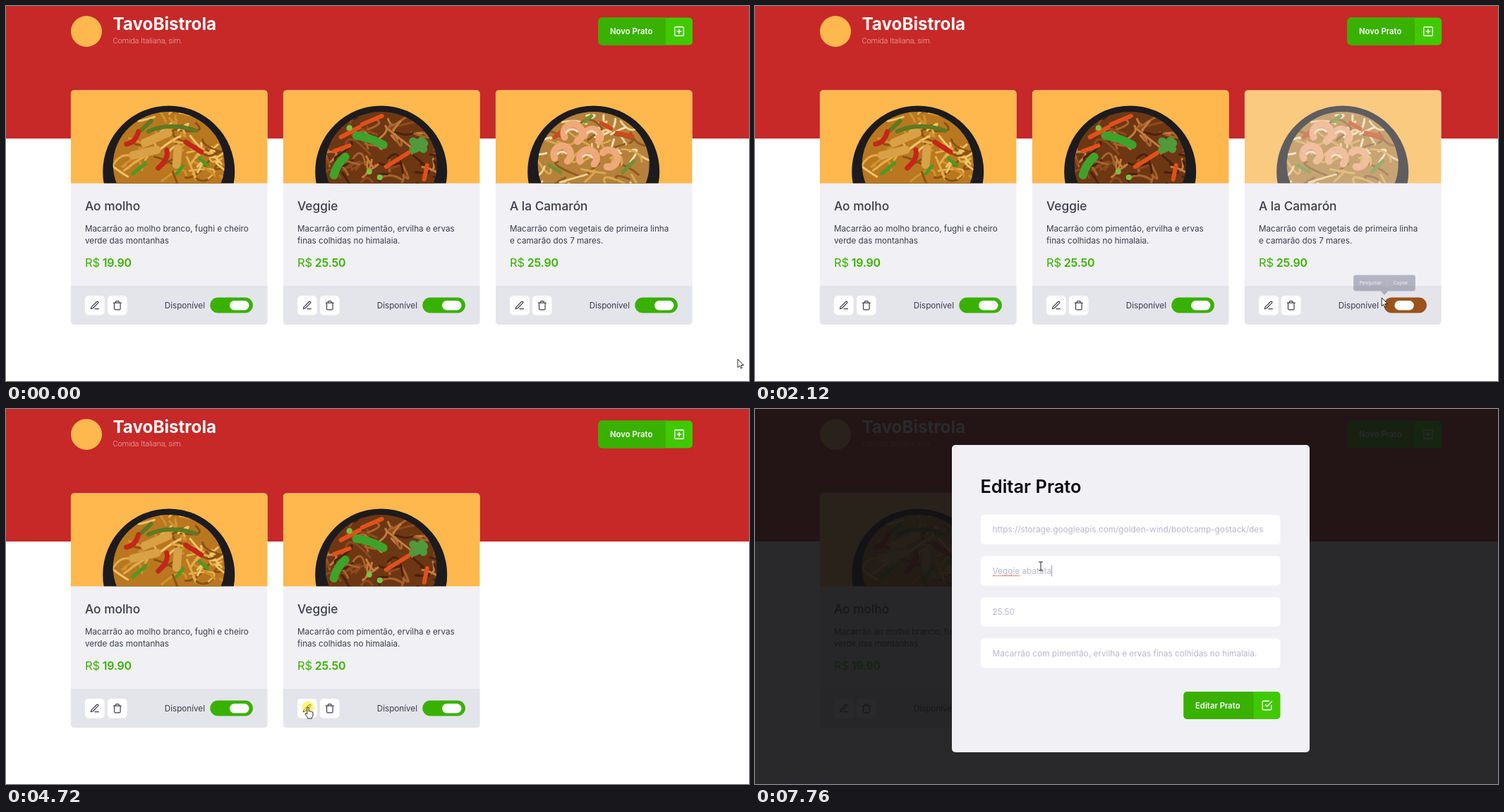
These frames come from a looping animation (1053x532 px, 8 s). An HTML page:

```html
<!DOCTYPE html>
<html lang="pt">
<head>
<meta charset="utf-8">
<title>TavoBistrola</title>
<style>
  html, body { margin: 0; width: 100%; height: 100%; overflow: hidden; background: #fff; }
  svg { display: block; width: 1053px; height: 532px; }
  text { font: 11.7px Inter, sans-serif; fill: #3d3d4d; }
  .brand { font-size: 24.2px; font-weight: 700; fill: #fff; }
  .tagline { font: 300 10.8px Roboto, sans-serif; fill: #f0b4b4; }
  .button { font-size: 11.3px; font-weight: 600; fill: #fff; }
  .dish { font-size: 17.3px; font-weight: 500; }
  .price { font-size: 16.5px; fill: #39b100; }
  .amount { font-size: 16px; font-weight: 600; fill: #39b100; letter-spacing: -.2px; }
  .heading { font-size: 25.4px; font-weight: 600; fill: #0a0a0d; }
  .field { font-size: 11.8px; fill: #b7b7cc; }
  .tip { font: 7px "Open Sans", sans-serif; fill: #fff; }
  .icon { fill: none; stroke: #3d3d4d; stroke-width: 2; stroke-linecap: round; stroke-linejoin: round; }
  .light { stroke: #fff; }
</style>
</head>
<body>
<svg id="stage" viewBox="0 0 1053 532">
  <defs>
    <clipPath id="cardClip"><rect y="119.5" width="279" height="332.5" rx="5"/></clipPath>
    <clipPath id="photoClip"><rect y="119.5" width="279" height="132"/></clipPath>
    <clipPath id="foodClip"><ellipse cx="139" cy="225" rx="79" ry="75"/></clipPath>
    <clipPath id="fieldClip"><rect x="336" y="150" width="392" height="220"/></clipPath>
  </defs>
  <rect width="1053" height="188" fill="#c72828"/>
  <circle cx="114" cy="36" r="22" fill="#ffb84d"/>
  <text class="brand" x="151.5" y="34">TavoBistrola</text>
  <text class="tagline" x="151.5" y="53">Comida Italiana, sim.</text>
  <g id="newDish"></g>
  <g id="cards"></g>
  <g id="popup">
    <path d="M886.5 404h11l-5.500 6z" fill="#3d3d5c"/>
    <rect x="848.500" y="382" width="87" height="22" rx="2.500" fill="#3d3d5c" stroke="#55557a"/>
    <path d="M896.500 387v12" stroke="#50506e"/>
    <text class="tip" x="856.500" y="395.300">Pesquisar</text>
    <text class="tip" x="904.500" y="395.300">Copiar</text>
  </g>
  <g id="modal">
    <rect width="1053" height="532" fill="#121214" opacity=".9"/>
    <rect x="279" y="51" width="507" height="436" rx="5" fill="#f0f0f5"/>
    <text class="heading" x="319.500" y="119">Editar Prato</text>
    <g id="fields"></g>
    <path id="squiggle" d="M337 236.500H376" stroke="#e0443c" stroke-width="1.300" stroke-dasharray="1.300 1.300"/>
    <rect id="caret" y="222" width="1" height="15.500" fill="#9a9ab0"/>
    <g id="save"></g>
  </g>
  <circle id="press" r="8.500" fill="#ffee20" opacity=".6"/>
  <g id="pointer" stroke-linejoin="round">
    <path id="arrow" d="M0 0V11.800L2.700 9.300L4.500 13.200L6.300 12.400L4.600 8.600H8.400Z" fill="#fff" stroke="#111" stroke-width=".9"/>
    <path id="hand" d="M-1.200 10V1.200A1.200 1.200 0 0 1 1.200 1.200V6Q2.400 5 3.400 6.200Q4.600 5.400 5.400 6.800Q7 6.400 7 8V11Q6.800 13 5.600 14.200V16H-.6V14.400L-3.800 10.400Q-4.400 8.800 -3 8.600Q-2 8.800 -1.200 10Z" fill="#fff" stroke="#111" stroke-width=".9"/>
    <path id="beam" d="M-3 -6H3M0 -6V6M-3 6H3" fill="none" stroke="#222"/>
  </g>
</svg>
<script>
const LOOP = 8000;
const $ = id => document.getElementById(id);

const ICONS = {
  pen: 'M12 20h9M16.5 3.5a2.100 2.100 0 0 1 3 3L7 19l-4 1 1-4z',
  bin: 'M3 6h18M19 6v14a2 2 0 0 1-2 2H7a2 2 0 0 1-2-2V6m3 0V4a2 2 0 0 1 2-2h4a2 2 0 0 1 2 2v2',
  plus: 'M5 3h14a2 2 0 0 1 2 2v14a2 2 0 0 1-2 2H5a2 2 0 0 1-2-2V5a2 2 0 0 1 2-2zM12 8v8M8 12h8',
  check: 'M9 11l3 3L22 4M21 12v7a2 2 0 0 1-2 2H5a2 2 0 0 1-2-2V5a2 2 0 0 1 2-2h11'
};
const icon = (name, x, y, scale, cls = '') =>
  `<path class="icon ${cls}" d="${ICONS[name]}" transform="translate(${x} ${y}) scale(${scale}) translate(-12 -12)"/>`;
const text = (cls, x, y, str) => `<text class="${cls}" x="${x}" y="${y}">${str}</text>`;
const rect = (x, y, w, h, r, fill, extra = '') =>
  `<rect x="${x}" y="${y}" width="${w}" height="${h}" rx="${r}" fill="${fill}" ${extra}/>`;

function button(x, y, w, label, name) {
  const split = x + w - 38;
  return rect(x, y, w, 39, 5, '#41c900') +
    `<path d="M${split} ${y}v39H${x + 5}a5 5 0 0 1-5-5v-29a5 5 0 0 1 5-5z" fill="#39b100"/>` +
    text('button', x + 16.5, y + 23.5, label) + icon(name, split + 19, y + 19.5, .7, 'light');
}

const DISHES = [
  { name: 'Ao molho', price: '19.90',
    lines: ['Macarrão ao molho branco, fughi e cheiro', 'verde das montanhas'],
    base: '#b9781f', noodles: ['#e3ad4c', '#d1922f', '#8a5212', '#f0c469'],
    toppings: [
      ['#d9a046', 12, 'M105 194L138 180M88 212L122 204M150 225L152 202'],
      ['#5e7a22', 6, 'M110 178Q140 164 178 177M100 176l14-13'],
      ['#c4261a', 7, 'M79 196Q92 194 96 178M124 230Q140 216 136 204M163 193l22 14'],
      ['#4c9a22', 5, 'M88 238l18-15M150 238l9-11M182 216l12 10']
    ] },
  { name: 'Veggie', price: '25.50',
    lines: ['Macarrão com pimentão, ervilha e ervas', 'finas colhidas no himalaia.'],
    base: '#6d3714', noodles: ['#a8622c', '#8d4a1c', '#4a220c', '#c27c3c'],
    toppings: [
      ['#e2501a', 6, 'M82 186l26-14M112 168l28-12M72 206l22-8M146 228l32-20M200 246l4-20'],
      ['#3fa22a', 12, 'M104 184Q122 186 142 197M72 240Q76 224 88 214'],
      ['#7bc142', 8, 'M94 173h.1M137 243h.1M122 235h.1'],
      ['#4f9a3a', 11, 'M184 192l4 2M196 191l4 4M184 204l5-2M199 203l-3-3']
    ] },
  { name: 'A la Camarón', price: '25.90',
    lines: ['Macarrão com vegetais de primeira linha', 'e camarão dos 7 mares.'],
    base: '#b5813b', noodles: ['#ecd08e', '#d9a84f', '#8f5a22', '#f4e0ae'],
    toppings: [
      ['#cf4a1c', 6, 'M172 180l22 5M84 186l12-10M150 166l14 8'],
      ['#6f8f35', 5, 'M76 226l16 10M180 236l16-16M126 164l10-8'],
      ['#efa878', 10, 'M98 186a13 13 0 1 1 18 6M126 184a11 11 0 1 1 20 8M84 216a12 12 0 1 1 18 4M120 220a12 12 0 1 1 20 4M158 228a12 12 0 1 0-6-20'],
      ['#f8d9bc', 3, 'M100 180a10 10 0 0 1 16-2M130 180a8 8 0 0 1 13 2M88 210a8 8 0 0 1 12-1M124 214a8 8 0 0 1 13 1']
    ] }
];

function photo(dish, seed) {
  const rand = () => (seed = (seed * 16807) % 2147483647) / 2147483647;
  const span = n => (rand() - .5) * n;
  let food = '';
  for (let i = 0; i < 60; i++) {
    const x = 139 + span(150), y = 205 + span(110);
    food += `<path d="M${x} ${y}q${span(50)} ${span(50)} ${span(70)} ${span(50)}" stroke="${dish.noodles[i % 4]}" stroke-width="3"/>`;
  }
  for (const [color, width, d] of dish.toppings)
    food += `<path d="${d}" stroke="${color}" stroke-width="${width}"/>`;
  return `<g class="photo" clip-path="url(#photoClip)">${rect(0, 119, 279, 133, 0, '#ffb84d')}
    <circle cx="139" cy="235" r="93.500" fill="#1d1b1d"/>
    <g clip-path="url(#foodClip)" fill="none" stroke-linecap="round">
      ${rect(55, 145, 170, 110, 0, dish.base)}${food}</g></g>`;
}

function card(dish, i) {
  return `<g transform="translate(${91.7 + 301 * i} 0)"><g clip-path="url(#cardClip)">
    ${rect(0, 119, 279, 334, 0, '#f0f0f5')}${photo(dish, 77 + 900 * i)}
    ${rect(0, 397, 279, 56, 0, '#e4e4eb')}
    ${text('dish', 20.3, 290, dish.name)}
    ${text('', 20.3, 320, dish.lines[0])}${text('', 20.3, 337.3, dish.lines[1])}
    ${text('price', 20.3, 370, 'R$')}${text('amount', 45, 370, dish.price)}
    ${rect(20.3, 411, 27.7, 27.5, 5, '#fff')}${rect(52.2, 411, 27.7, 27.5, 5, '#fff')}
    ${icon('pen', 34.2, 424.7, .61)}${icon('bin', 66.1, 424.7, .61)}
    ${text('', 133, 428.8, 'Disponível')}
    ${rect(197.6, 413.5, 60.6, 22, 11, '#39b100', 'class="track"')}
    ${rect(225.3, 418, 27.5, 13.5, 6.7, '#fff', 'class="knob"')}
  </g></g>`;
}

$('newDish').innerHTML = button(839.5, 16.5, 133.5, 'Novo Prato', 'plus');
$('save').innerHTML = button(607.5, 401, 137, 'Editar Prato', 'check');
$('cards').innerHTML = DISHES.map(card).join('');
const values = ['https://storage.googleapis.com/golden-wind/bootcamp-gostack/des',
  'Veggie', '25.50', 'Macarrão com pimentão, ervilha e ervas finas colhidas no himalaia.'];
$('fields').innerHTML = values.map((v, i) => rect(320, 150 + 58.5 * i, 424.5, 42, 5, '#fff')).join('') +
  `<g clip-path="url(#fieldClip)">${values.map((v, i) => text('field', 336.5, 175.2 + 58.6 * i, v)).join('')}</g>`;

const nameField = document.querySelectorAll('.field')[1];
const lastCard = $('cards').lastElementChild;
const [lastPhoto, track, knob] = ['.photo', '.track', '.knob'].map(s => lastCard.querySelector(s));

// Pointer stops: time, x, y, and shape from that time on when it changes
const PATH = [
  [0, 1037, 501, 'arrow'], [79, 1037, 501], [80, 735, 149], [200, 735, 149],
  [420, 624, 255], [700, 705, 400], [1040, 893, 432], [1080, 893, 432, 'hand'],
  [1180, 929, 424], [1600, 920, 422], [1960, 917, 422], [2060, 905, 418, 'arrow'],
  [2520, 776, 387], [2680, 762, 420, 'hand'], [2760, 762, 424], [3040, 768, 425, 'arrow'],
  [3520, 768, 425], [3760, 873, 70], [3920, 873, 70], [4400, 440, 420, 'hand'],
  [4560, 428, 423], [4760, 428, 423, 'arrow'], [4880, 428, 423], [5260, 476, 137],
  [5360, 462, 165, 'beam'], [5680, 405, 235], [5720, 405, 235], [5760, 413, 246],
  [6000, 413, 246], [6040, 406, 225], [6080, 406, 225], [6160, 405, 220], [6240, 405, 223]
];
const DRAG = [[1180, 0], [1600, .57], [1920, .69]];
const FADE = [[1160, 1], [1480, .73], [1920, .72], [2040, .69]];
const POPUP = [[2080, 0], [2200, 1], [3240, 1], [3320, .4], [3360, 0]];

function tween(keys, t, col = 1) {
  const i = keys.findIndex(k => k[0] > t);
  if (i < 0) return keys[keys.length - 1][col];
  if (i === 0) return keys[0][col];
  const a = keys[i - 1], b = keys[i];
  return a[col] + (b[col] - a[col]) * (t - a[0]) / (b[0] - a[0]);
}
const mix = (a, b, p) => `rgb(${a.map((v, i) => Math.round(v + (b[i] - v) * p))})`;
const show = (el, on) => el.style.display = on ? '' : 'none';
const within = (t, a, b) => t >= a && t < b;

function draw(t) {
  const x = tween(PATH, t), y = tween(PATH, t, 2);
  const shape = PATH.filter(k => k[3] && k[0] <= t).pop()[3];
  $('pointer').setAttribute('transform', `translate(${x} ${y})`);
  for (const id of ['arrow', 'hand', 'beam']) show($(id), id === shape);
  $('press').setAttribute('cx', x);
  $('press').setAttribute('cy', y);
  show($('press'), within(t, 2840, 2960) || within(t, 4640, 4760));

  const drag = tween(DRAG, t);
  knob.setAttribute('x', 225.3 - 18.3 * drag);
  track.setAttribute('fill', mix([57, 177, 0], [199, 40, 40], drag));
  lastPhoto.setAttribute('opacity', tween(FADE, t));
  show(lastCard, t < 3040);
  $('popup').setAttribute('opacity', tween(POPUP, t));

  show($('modal'), t >= 4760);
  const typed = t < 7160 ? 0 : Math.min(7, 1 + Math.floor((t - 7160) / 100));
  nameField.textContent = 'Veggie' + (typed ? ' ' + 'abatata'.slice(0, typed) : '');
  show($('squiggle'), t >= 6120);
  show($('caret'), within(t, 6120, 6600) || typed > 0);
  if (t >= 6120) $('caret').setAttribute('x', 336.5 + nameField.getComputedTextLength());
}

let start;
function loop(now) {
  start ??= now;
  draw((now - start) % LOOP);
  requestAnimationFrame(loop);
}
draw(0);
requestAnimationFrame(loop);
</script>
</body>
</html>
```
